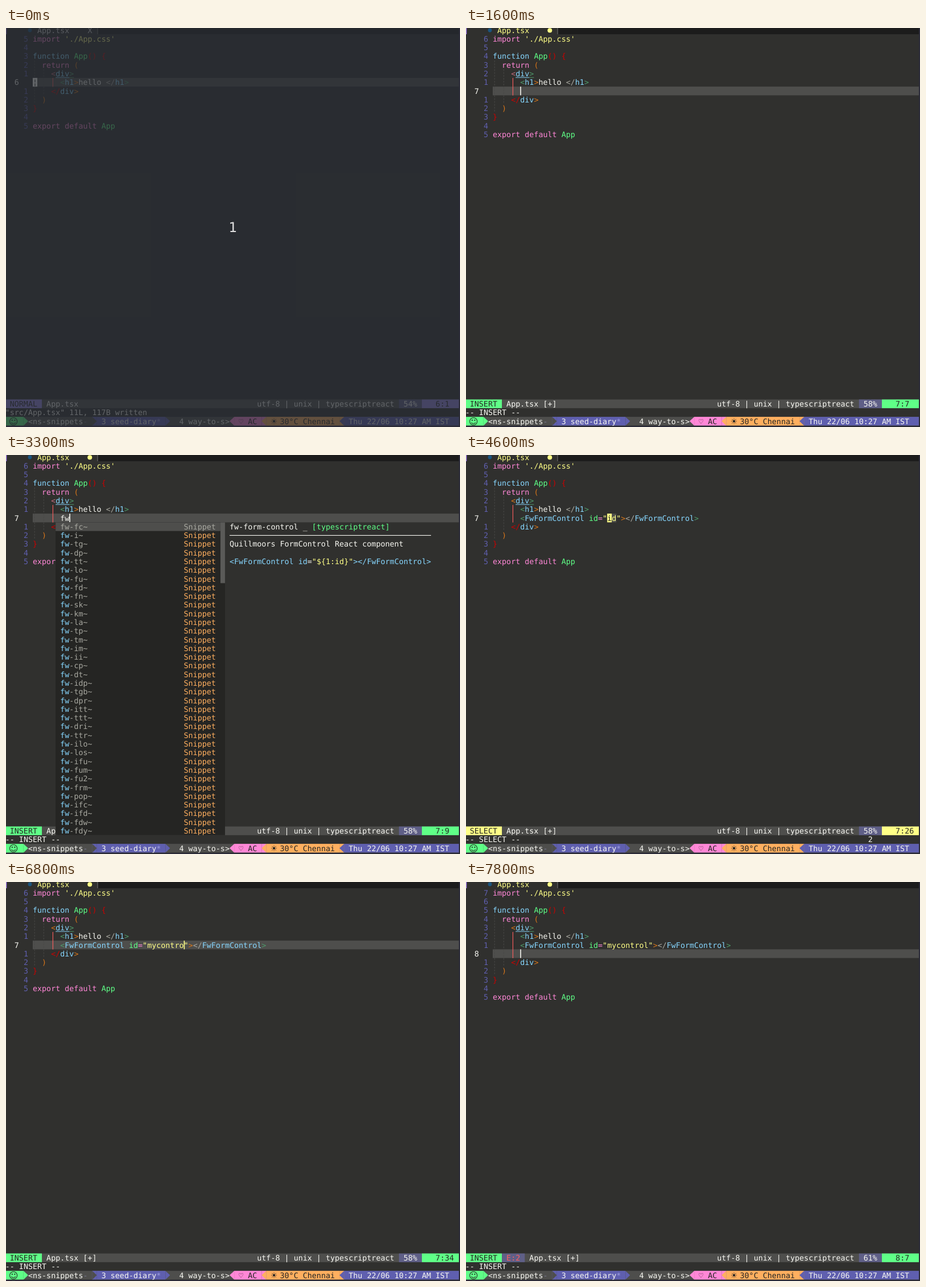
These frames come from a looping animation (798x702 px, 8 s). An HTML page:

```html
<!DOCTYPE html>
<html lang="en">
<head>
<meta charset="utf-8">
<title>Snippet completion in a terminal editor</title>
<style>
  html, body { margin: 0; width: 100%; height: 100%; overflow: hidden; background: #2b2b38; }
  svg { display: block; width: 798px; height: 702px; }
  text { font: 13.36px "DejaVu Sans Mono", monospace; text-rendering: geometricPrecision; white-space: pre; }
</style>
</head>
<body>
<svg id="screen" viewBox="0 0 798 702" xml:space="preserve"></svg>
<script>
const LOOP = 8000, CW = 8.047, CH = 15.29, RIGHT = 796;
const NS = "http://www.w3.org/2000/svg";
const svg = document.getElementById("screen");

const BG = "#30302e", GRAY = "#4e4e4c", DARK = "#252523", SLATE = "#5f5f87", VIOLET = "#5f5faf";
const INK = {
  w: "#f8f8f2", p: "#ff87d7", y: "#ffff87", c: "#87d7ff", g: "#5fff87", r: "#ff5f5f",
  d: "#cc0000", o: "#ffaf5f", b: "#d7761a", e: "#4e9a6a", n: VIOLET, m: "#a8a8a0",
  k: DARK, v: "#c06a7a", t: "#d0d0d0", l: "#9a9ae0", h: "#77778f"
};
const MODE = { NORMAL: "#9487e4", INSERT: INK.g, SELECT: INK.y };
const ITEMS = ("fc i tg dp tt lo fu fd fn sk km la tp tm im ii cp dt idp tgb dpr itt ttt dri " +
  "ttr ilo los ifu fum fu2 frm pop ifc ifd fdw fdy").split(" ");

const X = col => col * CW - 1.3;
const Y = row => row * CH - 3.9;

let layer;
function add(name, attrs, text) {
  const el = document.createElementNS(NS, name);
  for (const key in attrs) el.setAttribute(key, attrs[key]);
  if (text !== undefined) el.textContent = text;
  layer.append(el);
}
const box = (x, y, w, h, fill) => add("rect", { x, y, width: w, height: h, fill });
const cells = (row, from, to, fill, rows = 1) =>
  box(Math.max(0, X(from)), Y(row), Math.min(RIGHT, X(to)) - Math.max(0, X(from)), CH * rows, fill);

// "^x" picks an ink; a capital letter also underlines. Returns the end column.
function write(row, col, marked, bold) {
  for (const part of marked.split("^").slice(1)) {
    const key = part[0].toLowerCase(), text = part.slice(1), fill = INK[key];
    const lead = text.length - text.trimStart().length;
    const attrs = { x: X(col + lead), y: Y(row) + 12.4, fill };
    if (bold) attrs["font-weight"] = 700;
    if (text.trim()) add("text", attrs, text.trim());
    if (part[0] !== key) box(X(col), Y(row) + 14, text.length * CW, 1, fill);
    col += text.length;
  }
  return col;
}
function glyph(x, y, size, fill, char, family = "DejaVu Sans") {
  add("text", { x, y, fill, "text-anchor": "middle", style: `font-size:${size}px;font-family:"${family}",sans-serif` }, char);
}
function arrow(col, dir, fill, back) {
  const a = X(dir > 0 ? col : col + 1), b = X(dir > 0 ? col + 1 : col), y = Y(45);
  cells(45, col, col + 1, back);
  add("path", { d: `M${a} ${y}L${b} ${y + CH / 2}L${a} ${y + CH}Z`, fill });
}

const tag = (id, mark = "c") =>
  `^e<^${mark}FwFormControl^g id^p=^y"${id}"^b>^m</^${mark}FwFormControl^e>`;

function source(s) {
  const lines = [
    [0, "^pimport ^y'./App.css'"], [0, ""],
    [0, "^cfunction ^gApp^d() {"],
    [2, "^preturn ^b("],
    [4, `^${s.open}<^Cdiv^E>`],
    [6, "^e<^ch1^b>^whello ^m</^ch1^e>"]
  ];
  if (s.body !== null) lines.push([6, s.body]);
  if (s.row === 8) lines.push([6, ""]);
  return lines.concat([[4, "^d</^cdiv^b>"], [2, "^b)"], [0, "^d}"], [0, ""], [0, "^pexport default ^gApp"]]);
}

function drawTabs(s) {
  box(161, 0, RIGHT - 161, 11, "#1c1c1c");
  box(160, 0, 2, 11, GRAY);
  box(0, 0, 1.2, 11, "#af87ff");
  add("circle", { cx: 42, cy: 4, r: 3.4, fill: "#1a5580" });
  write(0, 7, s.dirty ? "^yApp.tsx" : "^tApp.tsx");
  if (s.dirty) add("circle", { cx: 147.3, cy: 4.2, r: 4, fill: INK.y });
  else write(0, 18, "^tX", true);
}

function drawCode(s) {
  const lines = source(s);
  if (s.mode !== "SELECT") cells(s.row, 6, 100, GRAY);
  if (s.mode === "SELECT") cells(7, 32, 33, GRAY);
  lines.forEach(([indent, text], i) => {
    const row = i + 1;
    for (let k = 0; k < indent; k += 2) {
      const x = X(6.4 + k), y = Y(row);
      if (k === 4) box(x - .5, y, 1.1, CH + .3, INK.r);
      else add("path", { d: `M${x} ${y}v${CH}`, stroke: "#494947", "stroke-dasharray": "3 2.1" });
    }
    if (row === s.row) write(row, 2, "^w" + row, true);
    else write(row, 4, "^n" + Math.abs(row - s.row));
    const end = write(row, 6 + indent, text);
    if (row === 7 && s.diag) {
      write(row, 0, "^rE");
      write(row, end + 5, "^r■■ Cannot find name 'FwFormControl'.");
    }
  });
  if (s.mode === "INSERT") box(X(s.col), Y(s.row), 1.6, CH, s.col > 30 ? INK.y : INK.w);
  else {
    cells(s.row, s.col, s.col + 1, s.col > 30 ? INK.y : INK.w);
    write(s.row, s.col, "^k" + s.under);
  }
  return lines.length;
}

function drawStatus(s, total) {
  const main = MODE[s.mode];
  cells(43, 0, 100, GRAY);
  cells(43, 0, 8, main);
  write(43, 1, "^k" + s.mode, true);
  if (s.errors) {
    cells(43, 8, 13, SLATE);
    write(43, 9, "^rE:2");
  }
  write(43, s.errors ? 14 : 9, "^wApp.tsx" + (s.dirty ? " [+]" : ""));
  write(43, 55, "^wutf-8 | unix | typescriptreact");
  cells(43, 86, 91, SLATE);
  write(43, 87, `^w${Math.floor(s.row / total * 100)}%`);
  cells(43, 91, 100, main);
  write(43, 94, `^k${s.row}:${s.col - 5}`, true);
  if (s.mode !== "NORMAL") write(44, 0, `^w-- ${s.mode} --`, true);
  else if (!s.dirty) write(44, 0, '^w"src/App.tsx" 11L, 117B written');
  write(44, 88, "^w" + s.keys);
}

function drawSessions() {
  cells(45, 0, 100, GRAY);
  cells(45, 0, 4, INK.g);
  arrow(4, 1, INK.g, GRAY);
  glyph(13, Y(45) + 13.4, 16, DARK, "☺");
  write(45, 5, "^w<ns-snippets^h-");
  cells(45, 20, 35, VIOLET);
  arrow(19, 1, GRAY, VIOLET);
  arrow(35, 1, VIOLET, GRAY);
  write(45, 21, "^w3 seed-diary^l*");
  write(45, 38, "^w4 way-to-s>");
  cells(45, 50, 56, INK.p);
  arrow(49, -1, INK.p, GRAY);
  write(45, 51, "^k♡ AC");
  cells(45, 57, 73, INK.o);
  arrow(56, -1, INK.o, INK.p);
  glyph(471, Y(45) + 13, 14, DARK, "☀");
  write(45, 60, "^k30°C Chennai");
  cells(45, 74, 100, VIOLET);
  arrow(73, -1, VIOLET, INK.o);
  write(45, 75, "^wThu 22/06 10:27 AM IST");
}

function drawMenu(s) {
  cells(8, 11, 48, DARK, 36);
  cells(8, 47, 48, "#5a5a58", 7);
  if (s.menu > 1) cells(8, 11, 47, GRAY);
  ITEMS.forEach((name, i) => {
    const picked = s.menu > 1 && i === 0;
    write(8 + i, 12, `^${picked ? "m" : "c"}fw^m-${name}~`);
    write(8 + i, 39, `^${picked ? "m" : "o"}Snippet`);
  });
  if (s.menu < 3) return;
  write(8, 49, "^wfw-form-control _ ^g[typescriptreact]");
  box(X(49), Y(9) + 7.2, 44 * CW, 1.1, INK.w);
  write(10, 49, "^wQuillmoors FormControl React component");
  write(12, 49, '^c<FwFormControl id^w=^y"${1:id}"^c></FwFormControl>');
}

function render(s) {
  layer = document.createElementNS(NS, "g");
  box(0, 0, RIGHT, 700, BG);
  drawTabs(s);
  const total = drawCode(s);
  drawStatus(s, total);
  drawSessions();
  if (s.menu) drawMenu(s);
  if (s.dim) {
    box(0, 0, RIGHT, 700, "rgba(40,44,50,.72)");
    glyph(398.5, 359, 24, "#e0e0e0", "1", "DejaVu Sans Mono");
  }
  svg.replaceChildren(layer);
}

const typed = id => ({ body: tag(id), col: 31 + id.length });

// Each step overrides the state left by the one before.
const STEPS = [
  [0, { dim: true, mode: "NORMAL", row: 6, col: 6, under: "¦", body: null, open: "v",
        dirty: false, diag: false, errors: false, menu: 0, keys: "" }],
  [100, { dim: false }],
  [1400, { keys: "o" }],
  [1600, { keys: "", mode: "INSERT", row: 7, col: 12, body: "", dirty: true }],
  [2100, { body: "^wf", col: 13 }],
  [2200, { body: "^wfw", col: 14, menu: 1 }],
  [3200, { menu: 2 }],
  [3300, { menu: 3 }],
  [4600, { mode: "SELECT", menu: 0, body: tag("id"), col: 31, under: "i", open: "b", keys: "2" }],
  [4900, { diag: true, body: tag("id", "C") }],
  [5600, { mode: "INSERT", keys: "", body: tag("m", "C"), col: 32 }],
  [5900, { body: tag("my", "C"), col: 33 }],
  [6000, { diag: false, body: tag("my") }],
  [6100, typed("myc")],
  [6300, typed("myco")],
  [6400, typed("mycon")],
  [6500, typed("mycont")],
  [6700, typed("mycontr")],
  [6800, typed("mycontro")],
  [6900, typed("mycontrol")],
  [7200, { mode: "NORMAL", col: 39, under: "l" }],
  [7300, { diag: true, errors: true, body: tag("mycontrol", "C") }],
  [7500, { mode: "INSERT", row: 8, col: 12 }],
  [7600, { diag: false, body: tag("mycontrol") }]
];
let state = {};
const SCENES = STEPS.map(([at, change]) => ({ at, state: state = { ...state, ...change } }));

const start = performance.now();
let shown = -1;
function tick() {
  const t = (performance.now() - start) % LOOP;
  const now = SCENES.findLastIndex(scene => scene.at <= t);
  if (now !== shown) render(SCENES[shown = now].state);
  requestAnimationFrame(tick);
}
tick();
</script>
</body>
</html>
```
